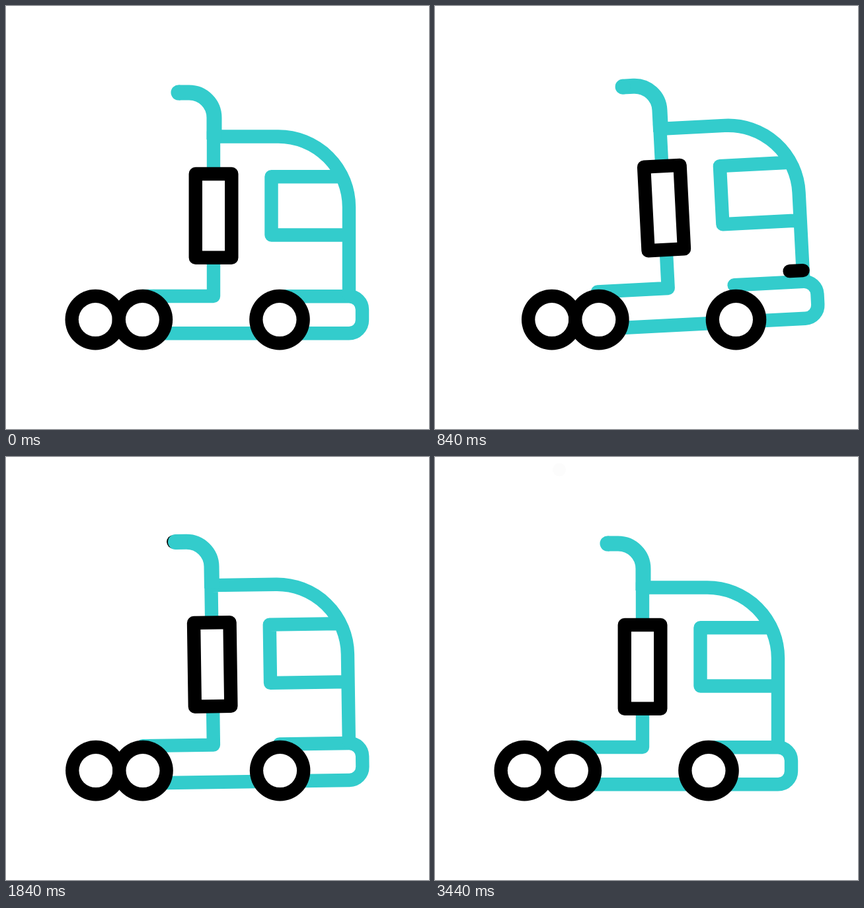
Write an HTML page with a canvas that moves like this. It is 640 by 640 pixels and loops after 3600 ms.

```html
<!DOCTYPE html>
<html lang="en">
<head>
<meta charset="utf-8">
<title>Truck</title>
<style>
  html, body { margin: 0; width: 100%; height: 100%; overflow: hidden; background: #fff; }
  canvas { display: block; width: 640px; height: 640px; }
</style>
</head>
<body>
<canvas id="stage" width="640" height="640"></canvas>
<script>
const ctx = document.getElementById('stage').getContext('2d');
const LOOP = 3600, LAST_STEP = 3440, STEP = 20;
const TEAL = '#33cccc', BLACK = '#000', WHITE = '#fff';

const PIPE = new Path2D('M261 131H277A38 38 0 0 1 315 169V202');
const CAB = new Path2D(
  'M314 190V439H207' +
  'M314 197.5H412A107 107 0 0 1 519 304.5V437' +
  'M506 258.3H401.5V346.5H519');
const CHASSIS = new Path2D(
  'M414 439.3H519A20 20 0 0 1 539 459.3V475.3A20 20 0 0 1 519 495.3H207');
const MUFFLER = new Path2D('M286.8 254H341.3V380.7H286.8Z');
const LAMP = new Path2D('M499 422.5H519');
const WHEELS = [135.3, 206.4, 414];
const PIVOT = { x: 78, y: 487 };

// Keyframes: [time, value], joined by sine easing
const SHIFT = [[0, 0], [360, -28.5], [880, 42.5], [1360, 42.5], [1880, 0]];
const TILT = [[0, 0], [360, 3.1], [760, 3.1], [1280, 0], [1360, 0], [1660, 2.92], [1940, 0]];
const LAMP_ON = [700, 1200];

// Smoke path: [distance, x, y]
const SMOKE = [[0, 261, 131], [11, 250, 131], [33, 229, 127], [57, 212, 110],
               [67, 209, 100], [111, 204.5, 56], [154, 187, 17]];
const PUFF_TIMES = [1937, 2320, 2562];
const FADE_START = 106, FADE_END = 152;

const mix = (a, b, u) => a + (b - a) * u;
const sine = u => (1 - Math.cos(Math.PI * u)) / 2;

function valueAt(keys, t) {
  const i = keys.findIndex(key => key[0] > t);
  if (i < 0) return keys[keys.length - 1][1];
  const [t0, v0] = keys[i - 1], [t1, v1] = keys[i];
  return mix(v0, v1, sine((t - t0) / (t1 - t0)));
}

function stroke(path, color, width) {
  ctx.strokeStyle = color;
  ctx.lineWidth = width;
  ctx.stroke(path);
}

function disc(x, y, radius, color) {
  ctx.fillStyle = color;
  ctx.beginPath();
  ctx.arc(x, y, radius, 0, Math.PI * 2);
  ctx.fill();
}

function drawPuff(age) {
  if (age < -130) return;
  const s = 11 + 0.0892 * age + 0.0000807 * age * age;
  if (s >= FADE_END) return;
  const i = SMOKE.findIndex(point => point[0] > s);
  if (i < 1) return;
  const [s0, x0, y0] = SMOKE[i - 1], [s1, x1, y1] = SMOKE[i];
  const u = (s - s0) / (s1 - s0);
  ctx.globalAlpha = Math.min(1, (FADE_END - s) / (FADE_END - FADE_START));
  disc(mix(x0, x1, u), mix(y0, y1, u), 10.2, BLACK);
  ctx.globalAlpha = 1;
}

function drawBody(t) {
  ctx.save();
  ctx.translate(PIVOT.x, PIVOT.y);
  ctx.rotate(-valueAt(TILT, t) * Math.PI / 180);
  ctx.translate(-PIVOT.x, -PIVOT.y);
  PUFF_TIMES.forEach(start => drawPuff(t - start));
  ctx.lineCap = 'round';
  stroke(CHASSIS, TEAL, 20.4);
  stroke(CAB, TEAL, 20.4);
  ctx.lineCap = 'butt';
  stroke(PIPE, TEAL, 23);
  disc(261, 131, 11.5, TEAL);
  ctx.fillStyle = WHITE;
  ctx.fill(MUFFLER);
  stroke(MUFFLER, BLACK, 20.4);
  if (t >= LAMP_ON[0] && t < LAMP_ON[1]) {
    ctx.lineCap = 'round';
    stroke(LAMP, BLACK, 20.4);
  }
  ctx.restore();
}

function draw(t) {
  ctx.fillStyle = WHITE;
  ctx.fillRect(0, 0, 640, 640);
  ctx.save();
  ctx.lineJoin = 'round';
  ctx.translate(valueAt(SHIFT, t), 0);
  drawBody(t);
  for (const x of WHEELS) {
    disc(x, 474.6, 45.8, BLACK);
    disc(x, 474.6, 25.5, WHITE);
  }
  ctx.restore();
}

function tick() {
  const t = performance.now() % LOOP;
  draw(Math.min(LAST_STEP, Math.floor(t / STEP) * STEP));
  requestAnimationFrame(tick);
}
tick();
</script>
</body>
</html>
```
